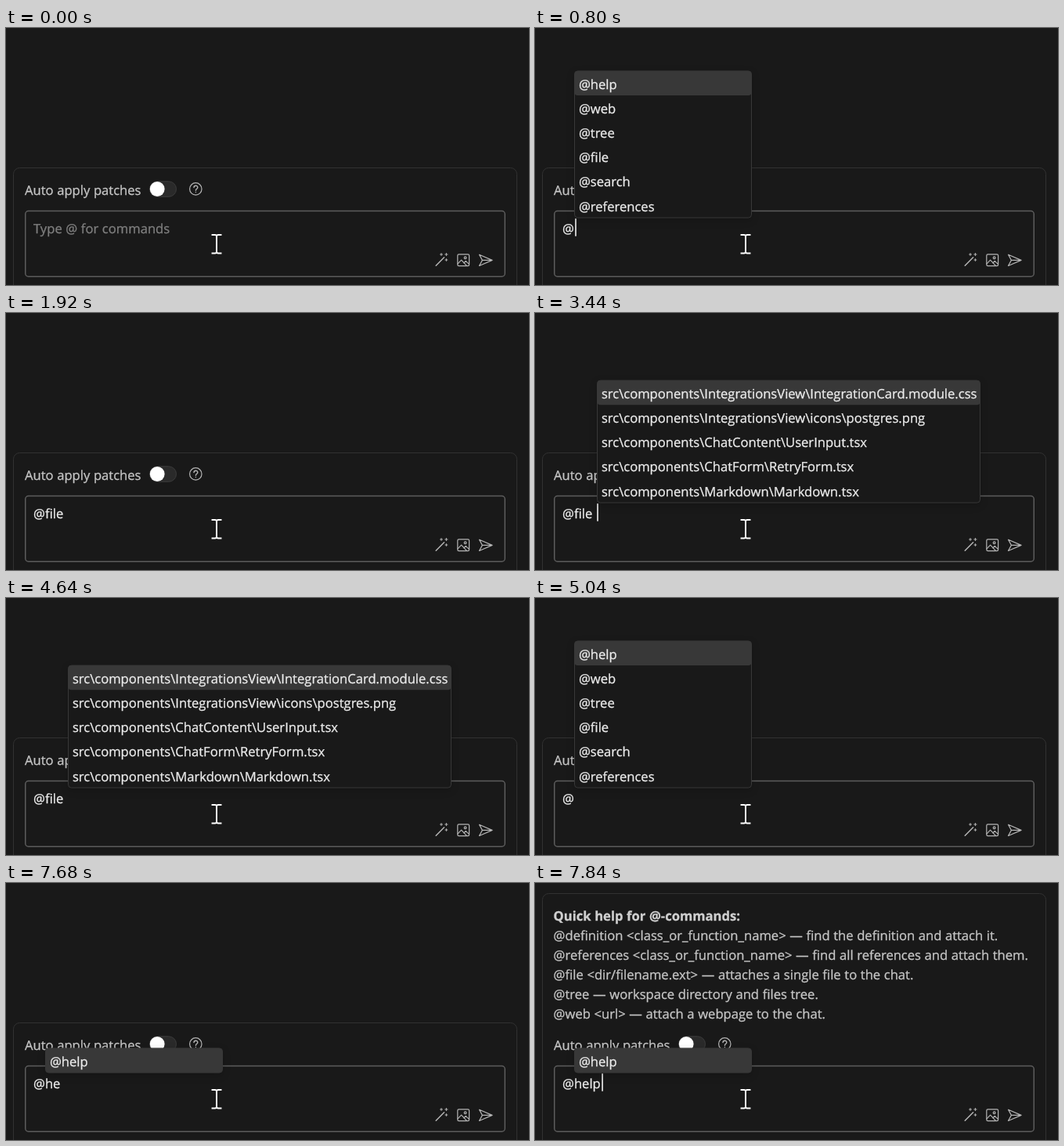
Animation of 668 by 328 pixels, one loop 8 s. Source, as an HTML page:

```html
<!DOCTYPE html>
<html lang="en">
<head>
<meta charset="utf-8">
<title>Chat commands</title>
<style>
  html, body { margin: 0; width: 100%; height: 100%; overflow: hidden; background: #191919; }
  svg { display: block; width: 668px; height: 328px; }
  text {
    font: 16.6px "Open Sans", "Noto Sans", sans-serif;
    color: #ececec; fill: currentColor; stroke: currentColor; stroke-width: .3;
    word-spacing: .3px; white-space: pre; text-rendering: geometricPrecision;
  }
  .label { color: #c6c6c6; }
  .bold { font-weight: 700; color: #cfcfcf; }
  .hint { color: #7f7f7f; }
  .icon { fill: none; stroke: #b5b5b5; stroke-width: 1.2; stroke-linejoin: round; stroke-linecap: round; }
  .popup { filter: drop-shadow(0 3px 5px rgba(0, 0, 0, .18)); }
</style>
</head>
<body>
<svg viewBox="0 0 668 328">
  <rect id="panel" x="9.5" width="643" height="400" rx="8" fill="none" stroke="#313131"/>
  <g id="help"></g>

  <text class="label" x="24" y="212.7">Auto apply patches</text>
  <rect x="183.5" y="195.8" width="34" height="19.5" rx="9.75" fill="#2a2a2a" stroke="#3c3c3c"/>
  <circle cx="193.2" cy="205.5" r="9.4" fill="#fff"/>
  <g class="icon">
    <circle cx="242.3" cy="205.4" r="7.7"/>
    <path d="M240 203.6c0-3.2 4.8-3.1 4.8-.2c0 1.9-2.4 1.9-2.4 3.8M242.4 209.4v.2" stroke-width="1.4"/>
  </g>

  <rect x="24.75" y="233.6" width="612.5" height="83.6" rx="4" fill="none" stroke="#5c5c5c" stroke-width="1.5"/>
  <text id="hint" class="hint" x="35" y="261.6">Type @ for commands</text>
  <text id="typed" x="35" y="261.6"></text>
  <rect id="caret" y="243.2" width="1.6" height="22.5" fill="#f2f2f2"/>

  <g class="icon">
    <path d="M549.2 303.2L559.6 292.8" stroke-width="1.5"/>
    <path d="M556 287.6v2.8M554.6 289h2.8M562.4 287.4v3.2M560.8 289h3.2M562.4 294.6v2.8M561 296h2.8" stroke-width="1"/>
    <rect x="576.8" y="288.9" width="14.8" height="14.8" rx="1.6"/>
    <path d="M577 300.8l4.6-4.6l6.8 7.2M584.8 299.8l2.4-2.4l4.2 4"/>
    <circle cx="586.6" cy="293.2" r="1.4"/>
    <path d="M604.5 289.3L621 296.4L604.5 303.5L608.4 296.4ZM608.4 296.4H620.5"/>
  </g>

  <g id="popups"></g>

  <path d="M263.5 264h3.5q2 0 2 2q0-2 2-2h3.5M269 266v20M263.5 287.5h3.5q2 0 2-2q0 2 2 2h3.5"
    fill="none" stroke="#fff" stroke-width="1.9" stroke-linecap="square"/>
</svg>
<script>
const LOOP = 8000, ROW = 31.2, BOTTOM = 242.1;
const $ = id => document.getElementById(id);

function add(parent, tag, attrs, text = "") {
  const el = document.createElementNS("http://www.w3.org/2000/svg", tag);
  for (const key in attrs) el.setAttribute(key, attrs[key]);
  el.textContent = text;
  parent.append(el);
  return el;
}

// A list that grows upwards from the input, first row selected
function popup(x, width, rows) {
  const g = add($("popups"), "g", { class: "popup" });
  const height = rows.length * ROW, top = BOTTOM - height;
  add(g, "rect", { x, y: top, width, height, rx: 4, fill: "#191919" });
  add(g, "rect", { x, y: top, width, height: ROW, rx: 4, fill: "#383838" });
  add(g, "rect", { x, y: top, width, height, rx: 4, fill: "none", stroke: "#383838" });
  rows.forEach((row, i) => add(g, "text", { x: x + 5.4, y: top + i * ROW + 22.6 }, row));
  return g;
}

const src = "src\\components\\";
const popups = {
  all: popup(50.5, 226, ["@help", "@web", "@tree", "@file", "@search", "@references"]),
  file: popup(50.5, 226, ["@file"]),
  help: popup(50.5, 226, ["@help"]),
  paths: popup(79.5, 489, [
    "IntegrationsView\\IntegrationCard.module.css",
    "IntegrationsView\\icons\\postgres.png",
    "ChatContent\\UserInput.tsx",
    "ChatForm\\RetryForm.tsx",
    "Markdown\\Markdown.tsx"
  ].map(path => src + path))
};

[
  "Quick help for @-commands:",
  "@definition <class_or_function_name> — find the definition and attach it.",
  "@references <class_or_function_name> — find all references and attach them.",
  "@file <dir/filename.ext> — attaches a single file to the chat.",
  "@tree — workspace directory and files tree.",
  "@web <url> — attach a webpage to the chat."
].forEach((line, i) =>
  add($("help"), "text", { class: i ? "label" : "label bold", x: 23.6, y: 47.8 + 25 * i }, line));

// start ms, typed text, popup, caret x (0 = hidden)
const steps = [
  [0, "", "", 0],
  [800, "@", "all", 51.2],
  [1280, "@f", "all", 57],
  [1360, "@f", "file", 57],
  [1440, "@fi", "file", 61],
  [1840, "@file", "", 75.5],
  [1920, "@file", "", 0],
  [3440, "@file ", "paths", 79.2],
  [3600, "@file ", "paths", 0],
  [4080, "@file ", "paths", 79.2],
  [4640, "@file ", "paths", 0],
  [5040, "@", "all", 0],
  [5120, "@", "all", 51.2],
  [5680, "@", "all", 0],
  [6240, "@", "all", 51.2],
  [6800, "@", "all", 0],
  [7040, "@h", "all", 0],
  [7120, "@h", "all", 61.3],
  [7200, "@he", "help", 70.2],
  [7680, "@he", "help", 0],
  [7840, "@help", "help", 85.3]
];

const show = (el, on) => el.setAttribute("visibility", on ? "visible" : "hidden");

let current;
function draw(now) {
  const t = now % LOOP;
  const step = steps.findLast(s => s[0] <= t);
  if (step !== current) {
    current = step;
    const [start, text, open, caret] = step;
    const helped = start >= 7840;
    $("panel").setAttribute("y", helped ? 13.5 : 178.5);
    show($("help"), helped);
    show($("hint"), !text);
    $("typed").textContent = text;
    show($("caret"), caret);
    $("caret").setAttribute("x", caret);
    for (const name in popups) show(popups[name], name === open);
  }
}

const begin = performance.now();
function tick() {
  draw(performance.now() - begin);
  requestAnimationFrame(tick);
}
tick();
</script>
</body>
</html>
```
